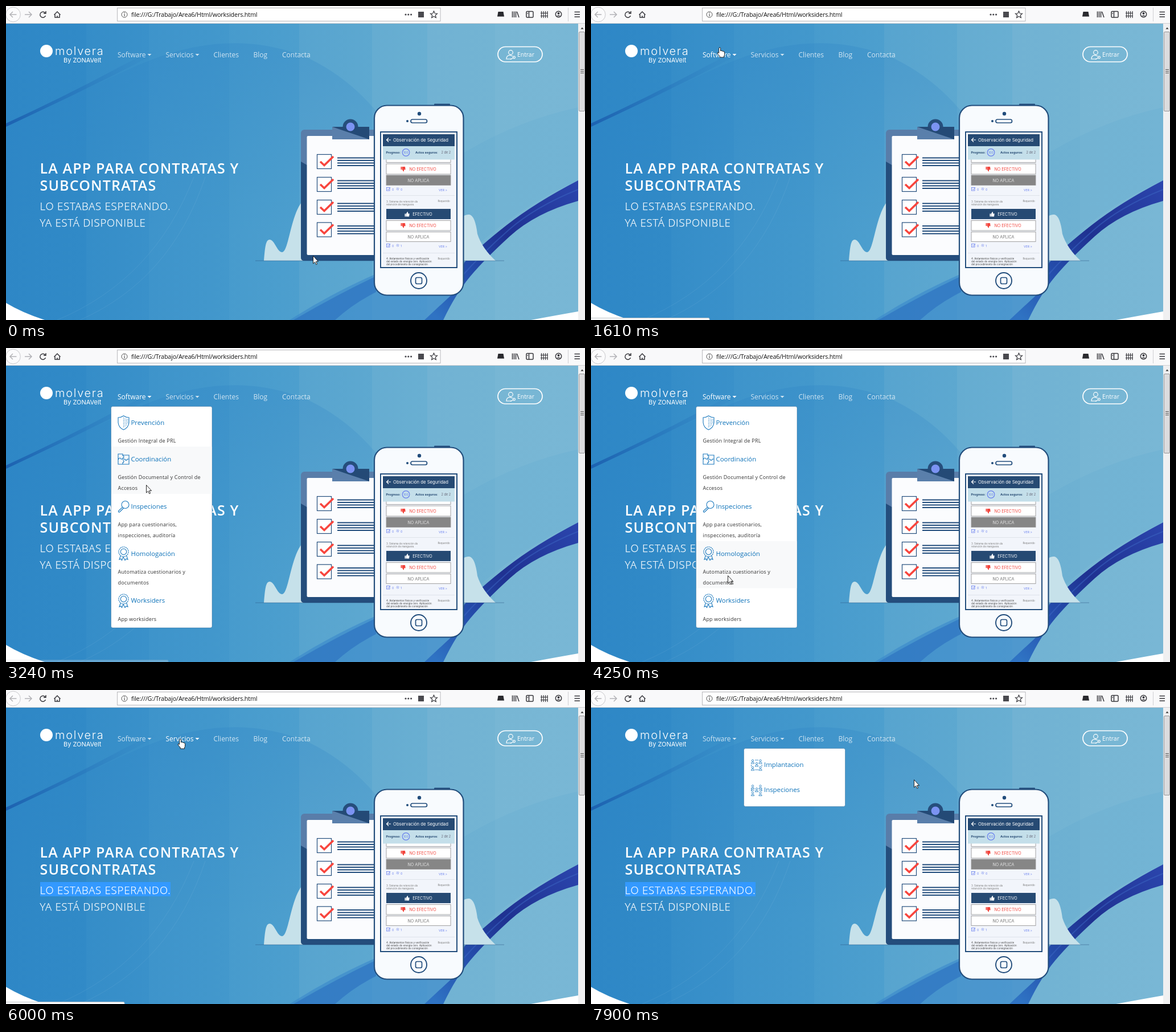
An HTML page that plays this animation: 1017 px wide and 551 px high, repeating every 8000 ms.

```html
<!DOCTYPE html>
<html lang="es">
<head>
<meta charset="utf-8">
<title>Contratas</title>
<style>
html,body{margin:0;width:100%;height:100%;overflow:hidden;background:#fff}
svg{display:block;width:100vw;height:100vh}
text{font-family:"Open Sans","Noto Sans",sans-serif}
.url{font-size:10.8px;letter-spacing:-.17px;fill:#111}
.nav text{font-size:12px;fill:#fff;opacity:.75}
.nav path{fill:#fff;opacity:.75}
.nav .on text,.nav .on path{opacity:1}
.logo{font-family:Inter,sans-serif;fill:#fff}
.h1{font-size:25px;font-weight:600;letter-spacing:1.15px;fill:#fff}
.h2{font-size:18.5px;font-weight:300;letter-spacing:.82px;fill:#fff;stroke:#fff;stroke-width:.25px}
.title{font-size:11.4px;fill:#0d72b9}
.desc{font-size:9px;letter-spacing:.2px;fill:#333}
.ico{fill:none;stroke:#1a78bd;stroke-width:1.1px}
.thin{stroke-width:.8px}
.bar{fill:none;stroke:#38383d;stroke-width:1.5}
.line{fill:none;stroke:#224d7c}
.app text{font-family:Inter,sans-serif}
.app .btn{font-size:7.1px;text-anchor:middle}
.app .tiny{font-size:4.4px;fill:#777}
.app .blue{font-size:5.2px;fill:#6a80ee}
.app .bold{font-size:5.4px;font-weight:700;fill:#264a73}
.pale{fill:none;stroke:#fff}
</style>
</head>
<body>
<svg viewBox="0 0 1017 551" preserveAspectRatio="none">
<defs>
  <linearGradient id="sky" gradientUnits="userSpaceOnUse" x1="0" y1="0" x2="1005" y2="0">
    <stop offset="0" stop-color="#2e87c6"/><stop offset=".14" stop-color="#318ac7"/>
    <stop offset=".14" stop-color="#358dc8"/><stop offset=".25" stop-color="#3a91ca"/>
    <stop offset=".25" stop-color="#3e94cb"/><stop offset=".39" stop-color="#4398cc"/>
    <stop offset=".39" stop-color="#479bcd"/><stop offset=".512" stop-color="#4d9fce"/>
    <stop offset=".512" stop-color="#57a4cf"/><stop offset=".64" stop-color="#5da8d0"/>
    <stop offset=".64" stop-color="#65acd1"/><stop offset=".736" stop-color="#69afd2"/>
    <stop offset=".736" stop-color="#71b2d3"/><stop offset=".855" stop-color="#73b4d3"/>
    <stop offset=".855" stop-color="#77b6d4"/><stop offset="1" stop-color="#79b7d5"/>
  </linearGradient>
  <linearGradient id="ribbon" gradientUnits="userSpaceOnUse" x1="1005" y1="310" x2="760" y2="551">
    <stop offset="0" stop-color="#2b45ad"/><stop offset=".45" stop-color="#1f3191"/>
    <stop offset=".75" stop-color="#2550ae"/><stop offset="1" stop-color="#2f73c3"/>
  </linearGradient>
  <linearGradient id="streak" gradientUnits="userSpaceOnUse" x1="0" y1="0" x2="270" y2="0">
    <stop offset="0" stop-color="#1858ab" stop-opacity=".8"/><stop offset="1" stop-color="#2a7bc0" stop-opacity="0"/>
  </linearGradient>
  <linearGradient id="dome" gradientUnits="userSpaceOnUse" x1="0" y1="70" x2="0" y2="400">
    <stop offset="0" stop-color="#2a80c4" stop-opacity=".25"/><stop offset="1" stop-color="#2a80c4" stop-opacity="0"/>
  </linearGradient>
  <clipPath id="hero"><path d="M0 31H1005V536Q965 543 922 551H68Q28 538 0 521Z"/></clipPath>
  <clipPath id="screen"><rect x="662" y="225" width="126" height="232"/></clipPath>
  <g id="check"><rect x=".5" y=".5" width="25" height="25" fill="#fff" stroke="#224d7c" stroke-width="1.2"/>
    <path d="M6 13L13 19.500 29 4" fill="none" stroke="#f8453d" stroke-width="3.600"/>
    <path class="line" stroke-width="2" d="M36 6.500H102M36 11H102M36 15.500H102M36 20H102"/></g>
  <path id="thumb" d="M-4-1H-2V4H-4ZM-1.500-1L.5-4.500Q2-4.500 1.500-1.200H4.200L3.500 4H-1.500Z"/>
  <g id="award" class="ico"><circle r="8.500" cy="-2.500" stroke-dasharray="2.500 .8"/><circle r="5.200" cy="-2.500"/>
    <path d="M-5 4L-7.500 11-4.500 10-3 12.500-.5 6.500 2.500 12.500 4.500 10 7.500 11 5 4"/></g>
  <g id="man"><circle cy="-2.600" r="1.700"/><path d="M-2.700 2.600Q-2.700 0 0 0T2.700 2.600Z"/></g>
  <g id="counts"><rect x="668.500" y="-3" width="5.500" height="5.500" fill="none" stroke="#6a80ee" stroke-width=".8"/>
    <path d="M670-.5L671.500 1 675-3M686-2.500L690 1.500M685.500-.5L688 2M688-3L690.500-.5" fill="none" stroke="#6a80ee" stroke-width=".8"/></g>
</defs>

<rect width="1017" height="551" fill="#fff"/>

<g clip-path="url(#hero)">
  <rect y="31" width="1005" height="520" fill="url(#sky)"/>
  <path d="M0 210Q130 150 218 110 390 30 534 93 640 145 700 260L640 400H0Z" fill="url(#dome)"/>
  <path d="M0 206Q100 160 190 112T270 80Q190 122 110 160T0 212Z" fill="url(#streak)"/>
  <path d="M800 260Q900 200 1005 178V306Q900 350 800 445Z" fill="#4f9fce" opacity=".12"/>
  <path class="pale" opacity=".07" d="M90 551Q260 480 330 300M130 551Q290 480 350 300"/>
  <path d="M498 551Q570 505 650 470H806L790 505 768 551Z" fill="#3a88cb" opacity=".6"/>
  <path d="M505 551Q575 510 650 474V502Q610 522 578 551Z" fill="#2a6fc0" opacity=".6"/>
  <path d="M1005 306Q930 345 880 384T805 450L790 500 735 551H768Q790 505 815 475T885 404 1005 342Z" fill="url(#ribbon)"/>
  <path d="M1005 322Q930 352 883 393T800 475" fill="none" stroke="#3c68c4" stroke-width="2" opacity=".5"/>
</g>

<g>
  <path d="M453 447C455 424 456 410 463 410 472 410 476 432 485 432 498 432 500 350 530 335V447ZM800 372Q806 365 814 366 824 368 828 400 836 425 860 447H800Z" fill="#c6e1ea"/>
  <path class="line" stroke-width=".8" opacity=".6" d="M438 447H875"/>
  <rect x="518" y="217" width="150" height="230" rx="6" fill="#597da9"/>
  <path d="M518 273L670 360V447H524Q518 447 518 441Z" fill="#244d7c"/>
  <rect x="528.500" y="228" width="140" height="209" rx="2" fill="#fbfcfe"/>
  <circle cx="605" cy="212" r="13.500" fill="#264e7c"/><circle cx="605" cy="212" r="7.500" fill="#7b93f2"/>
  <rect x="573" y="212" width="65" height="22" fill="#244a76"/>
  <path d="M573 212L638 234H573Z" fill="#5a7fab"/>
  <path d="M597.500 212A7.500 7.500 0 0 0 612.500 212" fill="#7b93f2"/>
  <use href="#check" x="546" y="260"/><use href="#check" x="546" y="300"/>
  <use href="#check" x="546" y="340"/><use href="#check" x="546" y="379.500"/>
</g>

<g class="app">
  <rect x="752" y="171.500" width="28" height="5" rx="1" fill="#244d7c"/>
  <rect x="647" y="174.500" width="156.500" height="333" rx="22" fill="#f8fbfe" stroke="#224d7c" stroke-width="2.200"/>
  <circle cx="726" cy="189" r="3.200" fill="#224d7c"/><circle cx="705" cy="202" r="2" fill="#224d7c"/>
  <rect class="line" x="711" y="199" width="28.500" height="6" rx="3" stroke-width="1.700"/>
  <circle class="line" cx="725" cy="482" r="14" stroke-width="1.900"/>
  <rect class="line" x="719.500" y="476.500" width="11" height="11" rx="2.500" stroke-width="1.700"/>
  <rect x="658" y="221" width="134" height="238" fill="#fff" stroke="#224d7c" stroke-width="2"/>
  <g clip-path="url(#screen)">
    <rect x="662" y="225" width="126" height="232" fill="#f2f5fb"/>
    <rect x="668" y="262" width="113" height="12.500" fill="#fff" stroke="#999" stroke-width=".9"/>
    <rect x="662" y="225" width="126" height="21" fill="#264a73"/>
    <path class="pale" stroke-width="1.200" d="M676 235H668.500M672 231.500L668.500 235 672 238.500"/>
    <text x="680" y="238" font-size="7.700" fill="#fff">Observación de Seguridad</text>
    <rect x="662" y="246" width="126" height="23.500" fill="#c4dfea"/>
    <text class="bold" x="667.500" y="258.500">Progreso:</text>
    <circle cx="702.500" cy="257" r="6.300" fill="none" stroke="#6a80ee" stroke-width="1.200"/>
    <text class="blue" x="698" y="259">100</text>
    <text class="bold" x="719" y="258.500">Actos seguros:</text>
    <text x="764.500" y="258.500" font-size="5.600" fill="#667">2 de 2</text>
    <g fill="#fff" stroke="#999" stroke-width=".9">
      <rect x="668" y="277" width="113" height="18"/>
      <rect x="668" y="297" width="113" height="17.500" fill="#868686"/>
      <rect x="668" y="356" width="113" height="18" fill="#264a73" stroke="none"/>
      <rect x="668" y="376.500" width="113" height="17.500"/>
      <rect x="668" y="396.500" width="113" height="17"/>
    </g>
    <g fill="#f2453d"><text class="btn" x="732" y="289">NO EFECTIVO</text><text class="btn" x="732" y="388">NO EFECTIVO</text>
      <use href="#thumb" transform="translate(697.500 286) scale(1 -1)"/><use href="#thumb" transform="translate(697.500 385) scale(1 -1)"/></g>
    <text class="btn" x="724.500" y="308.500" fill="#e3e3e3">NO APLICA</text>
    <text class="btn" x="724.500" y="407.500" fill="#777">NO APLICA</text>
    <text class="btn" x="731.500" y="367.800" fill="#fff">EFECTIVO</text>
    <use href="#thumb" x="704.500" y="365.500" fill="#fff"/>
    <use href="#counts" y="321.500"/><use href="#counts" y="420.500"/>
    <g class="blue"><text x="678" y="323.500">0</text><text x="693" y="323.500">0</text><text x="760" y="325">VER &gt;</text>
      <text x="678" y="422.500">0</text><text x="693" y="422.500">1</text><text x="760" y="424">VER &gt;</text></g>
    <path stroke="#dadfe6" stroke-width=".8" d="M662 332.500H788M662 433.500H788"/>
    <g class="tiny"><text x="668" y="344.500">3. Sistema de retención de</text><text x="668" y="350">retención de manguera.</text>
      <text x="758.500" y="344">Requerido</text><text x="758.500" y="444.500">Requerido</text></g>
    <g class="tiny" style="fill:#444"><text x="668" y="444.800">4. Aislamientos físicos y verificación</text>
      <text x="668" y="450">del estado de energía cero. Aplicación</text><text x="668" y="455.200">del procedimiento de consignación</text></g>
  </g>
</g>

<circle cx="71" cy="79" r="11" fill="#fff"/>
<text class="logo" x="86" y="86" font-size="20" font-weight="300" letter-spacing="1.700">molvera</text>
<text class="logo" x="101" y="99" font-size="11">By ZONAVelt</text>
<g class="nav">
  <g id="nav1"><text x="196" y="90">Software</text><path d="M248.500 84H255.500L252 87.500Z"/></g>
  <g id="nav2"><text x="280.500" y="90">Servicios</text><path d="M332.500 84H339.500L336 87.500Z"/></g>
  <text x="364.500" y="90">Clientes</text><text x="434.500" y="90">Blog</text><text x="485" y="90">Contacta</text>
</g>
<g class="pale" stroke-width="1.200"><rect x="864" y="71.500" width="78" height="26.500" rx="13.250" stroke-width="1.700"/>
  <circle cx="886.500" cy="81.500" r="3.800"/><path d="M888 93H879Q879 86 886 86.500L890 88"/><circle cx="892.500" cy="90" r="1.900"/><path d="M890.800 91L886 93.500"/></g>
<text x="898" y="88.500" font-size="10.400" fill="#fff">Entrar</text>

<rect id="mark" x="60" y="337" width="229" height="25" fill="#39f"/>
<text class="h1" x="59.500" y="293.500">LA APP PARA CONTRATAS Y</text><text class="h1" x="59.500" y="324">SUBCONTRATAS</text>
<text class="h2" x="59.500" y="358">LO ESTABAS ESPERANDO.</text><text class="h2" x="59.500" y="386.500">YA ESTÁ DISPONIBLE</text>

<g id="menu1">
  <rect x="184.500" y="102.500" width="177.500" height="388.500" rx="3" fill="#fff" stroke="#27608f" stroke-opacity=".45"/>
  <rect id="hover1" x="185" width="176.500" fill="#f8f9fa"/>
  <g class="ico"><path d="M206.500 119Q211 122 216 122V131Q215 140 206.500 143.500 198 140 197 131V122Q202 122 206.500 119Z"/>
    <path stroke-dasharray="1 1.500" d="M206.500 122V140M209 123.500V139M211.500 124.500V137M214 125V133"/>
    <path d="M197 186H205V189A2 2 0 0 1 205 193V195H202A2 2 0 0 0 198 195H197ZM205 188H216V195H213A2 2 0 0 1 209 195H205M197 195V204H205V201A2 2 0 0 0 205 197M205 204H216V195"/>
    <circle cx="209.500" cy="275" r="6.500"/><path d="M204.500 279.500L197.500 286Q197 288.500 199.500 288L206.500 281"/></g>
  <use href="#award" x="206.500" y="360"/><use href="#award" x="206.500" y="443"/>
</g>
<g id="menu2">
  <rect x="268.500" y="102.500" width="178" height="102" rx="3" fill="#fff" stroke="#27608f" stroke-opacity=".45"/>
  <rect id="hover2" x="269" width="177" fill="#f8f9fa"/>
  <g class="ico thin">
    <g id="team"><use href="#man" x="284" y="126.500"/><use href="#man" x="297.500" y="126.500"/><use href="#man" x="291" y="131.500"/>
    <use href="#man" x="284" y="138.500"/><use href="#man" x="297.500" y="138.500"/></g>
    <use href="#team" y="44.500"/>
    <path d="M288 123H294M288 140H294M281.500 131V134M300 131V134M281 176H287M283 174L281 176 283 178M300.500 176H295M298.500 174L300.500 176 298.500 178"/>
  </g>
</g>

<g id="status"><rect id="tip" x="-3" y="547.500" height="10" rx="2" fill="#f7f8f9" stroke="#c4c8cc"/></g>

<rect width="1017" height="31" fill="#f9f9fa"/><path d="M0 30.500H1017" stroke="#cfcfd2"/>
<circle cx="12.500" cy="15" r="12.800" fill="#fbfbfc" stroke="#c9c9cc"/>
<g fill="none" stroke="#b4b4b8" stroke-width="1.500"><path d="M18.500 15H7.500M12 10L7 15 12 20M33 15H45M40 10L45 15 40 20"/></g>
<g class="bar"><path d="M69 12.500A5 5 0 1 0 69.500 17M70 9V13H66M84.500 15.500L90 10 95.500 15.500M86 15V20H94V15M90 20V17"/></g>
<rect x="195.500" y="3.500" width="567.500" height="23" fill="#fff" stroke="#b8b8bc"/>
<circle cx="208" cy="15" r="5" fill="none" stroke="#555"/><path d="M208 14V18M208 11.500V13" stroke="#555" stroke-width="1.200"/>
<text class="url" x="220" y="18.800">file:///G:/Trabajo/Area6/Html/worksiders.html</text>
<g fill="#4a4a4f"><circle cx="702" cy="15" r="1.600"/><circle cx="706.800" cy="15" r="1.600"/><circle cx="711.600" cy="15" r="1.600"/><rect x="724" y="10" width="10" height="10"/></g>
<path class="bar" style="stroke-width:1.2px" d="M751.500 9L753.300 13 757.500 13.300 754.300 16.200 755.300 20.500 751.500 18.200 747.700 20.500 748.700 16.200 745.500 13.300 749.700 13Z"/>
<path d="M864.500 10H873.500L875 18.500H863Z" fill="#2a2a2e"/>
<g class="bar"><path d="M889.500 9.500V20M892.500 9.500V20M895.500 9.500V20M897.500 10L901 20"/>
  <rect x="914" y="9.500" width="12" height="10.500" rx="1.500"/><path d="M918.500 10V20M915.500 13H917"/>
  <path stroke-width="1.200" d="M940.500 9V21M944 9V21M947.500 9V21M951 9V21M939 12.500H952M939 17.500H952"/>
  <circle cx="970.500" cy="14.500" r="5.200"/><path d="M998.500 10.500H1008M998.500 14.800H1008M998.500 19H1008"/></g>
<circle cx="970.500" cy="13" r="2" fill="#38383d"/><path d="M967 18Q970.500 14.500 974 18Z" fill="#38383d"/>
<path d="M987.500 3V27" stroke="#d0d0d3"/>

<rect x="1005" y="31" width="12" height="520" fill="#f0f0f1"/>
<path d="M1009.500 40.500L1012 37.500 1014.500 40.500Z" fill="#333"/>
<rect x="1006.500" y="45.500" width="10" height="139" rx="1.500" fill="#dcdcde" stroke="#979799"/>
<path d="M1009 111.500H1015M1009 114.500H1015M1009 117.500H1015" stroke="#555"/>

<path id="arrow" d="M.5.500V14L3.600 11.200 5.700 15.700 7.600 14.800 5.600 10.400H9.500Z" fill="#fff" stroke="#111" stroke-width=".9"/>
<path id="hand" d="M-1.300 9.500V1.300A1.400 1.400 0 0 1 1.500 1.300V5.800Q3.800 4.500 4.300 6.300 6.300 5.400 6.700 7 8.600 6.600 8.500 8.500V12Q8.500 14 7.500 15V17H.2V15Q-3.800 11-4 9 -3.500 7.300-1.300 9.500Z" fill="#fff" stroke="#111" stroke-width=".9"/>
</svg>
<script>
const $ = id => document.getElementById(id);
const LOOP = 8000;

// bursts of movement: first change, last change, number of changes
const bursts = [[50,280,4],[430,1190,12],[1400,1400,1],[1540,1610,2],[1760,1760,1],[1960,1960,1],
  [2220,3020,12],[3090,3830,11],[3900,4670,12],[4740,5520,12],[5590,5660,2],[5860,6380,8],
  [6540,6950,6],[7180,7460,5],[7830,7900,2]];
const ticks = [0];
for (const [a, b, n] of bursts)
  for (let i = 0; i < n; i++) ticks.push(Math.floor((a + (n > 1 ? i * (b - a) / (n - 1) : 0)) / 10) * 10);

// pointer tip: time, x, y
const path = [[0,539,438],[50,500,416],[200,395,351],[280,404,360],[430,396,350],[840,310,164],[1190,228,94],
  [1400,233,94],[1610,226,73],[1760,233,83],[2150,233,83],[2290,238,97],[3020,256,192],[3230,246,240],
  [3830,222,303],[4200,236,385],[4450,258,455],[4670,331,449],[5090,384,332],[5240,387,334],[5520,311,101],
  [5590,309,98],[5860,307,78],[6000,306,86],[6150,308,88],[6380,330,127],[6700,348,150],[6950,358,171],
  [7180,410,170],[7460,567,157]];

function pointAt(t) {
  const i = path.findIndex(p => p[0] > t);
  if (i < 0) return path[path.length - 1].slice(1);
  const [t0, x0, y0] = path[i - 1], [t1, x1, y1] = path[i], k = (t - t0) / (t1 - t0);
  return [x0 + (x1 - x0) * k, y0 + (y1 - y0) * k].map(Math.round);
}

function addText(parent, cls, x, y, str) {
  const el = document.createElementNS('http://www.w3.org/2000/svg', 'text');
  el.setAttribute('class', cls);
  el.setAttribute('x', x);
  el.setAttribute('y', y);
  el.textContent = str;
  parent.append(el);
}

// menu entries: top edge, title, description lines
const software = [[103,'Prevención','Gestión Integral de PRL'],
  [173,'Coordinación','Gestión Documental y Control de','Accesos'],
  [256,'Inspeciones','App para cuestionarios,','inspecciones, auditoría'],
  [339,'Homologación','Automatiza cuestionarios y','documentos'],
  [421.5,'Worksiders','App worksiders']];
const services = [[109,'Implantacion'],[153.5,'Inspeciones']];
software.forEach(([top, title, ...lines], i) => {
  const y = i ? top + 25.5 : 134.5;
  addText($('menu1'), 'title', 219.5, y, title);
  lines.forEach((s, j) => addText($('menu1'), 'desc', 196.5, y + 31.5 + j * 19, s));
});
services.forEach(([top, title]) => addText($('menu2'), 'title', 304, top + 25.5, title));

function hover(el, list, end, left, right, [x, y]) {
  const i = x > left && x < right && y < end ? list.findLastIndex(m => m[0] <= y) : -1;
  el.style.display = i < 0 ? 'none' : '';
  if (i < 0) return;
  el.setAttribute('y', list[i][0]);
  el.setAttribute('height', (list[i + 1] ? list[i + 1][0] : end) - list[i][0]);
}

const show = (id, on) => { $(id).style.display = on ? '' : 'none'; };
const last = (steps, t) => steps.reduce((v, [at, n]) => t >= at ? n : v, 0);
const tipWidth = [[1540,208],[2360,285],[5860,208],[6540,357]];
const tipAlpha = [[1540,1],[3160,.6],[3230,.25],[3310,0],[5860,1],[7830,.4],[7900,0]];

function draw(now) {
  const t = ticks.reduce((v, k) => k <= now ? k : v, 0);
  const within = (a, b) => t >= a && t < b;
  const pos = pointAt(t);
  const hand = within(1400, 2360) || within(5590, 6230);
  show('hand', hand);
  show('arrow', !hand);
  $(hand ? 'hand' : 'arrow').setAttribute('transform', `translate(${pos})`);
  show('menu1', within(1960, 5230));
  show('menu2', t >= 6150);
  show('mark', t >= 5230);
  $('nav1').classList.toggle('on', within(1400, 4880));
  $('nav2').classList.toggle('on', within(5590, 7180));
  hover($('hover1'), software, 490, 185, 362, pos);
  hover($('hover2'), services, 198, 269, 446, pos);
  $('tip').setAttribute('width', last(tipWidth, t) + 3);
  $('status').style.opacity = last(tipAlpha, t);
}

const start = performance.now();
function frame() {
  draw((performance.now() - start) % LOOP);
  requestAnimationFrame(frame);
}
frame();
</script>
</body>
</html>
```
